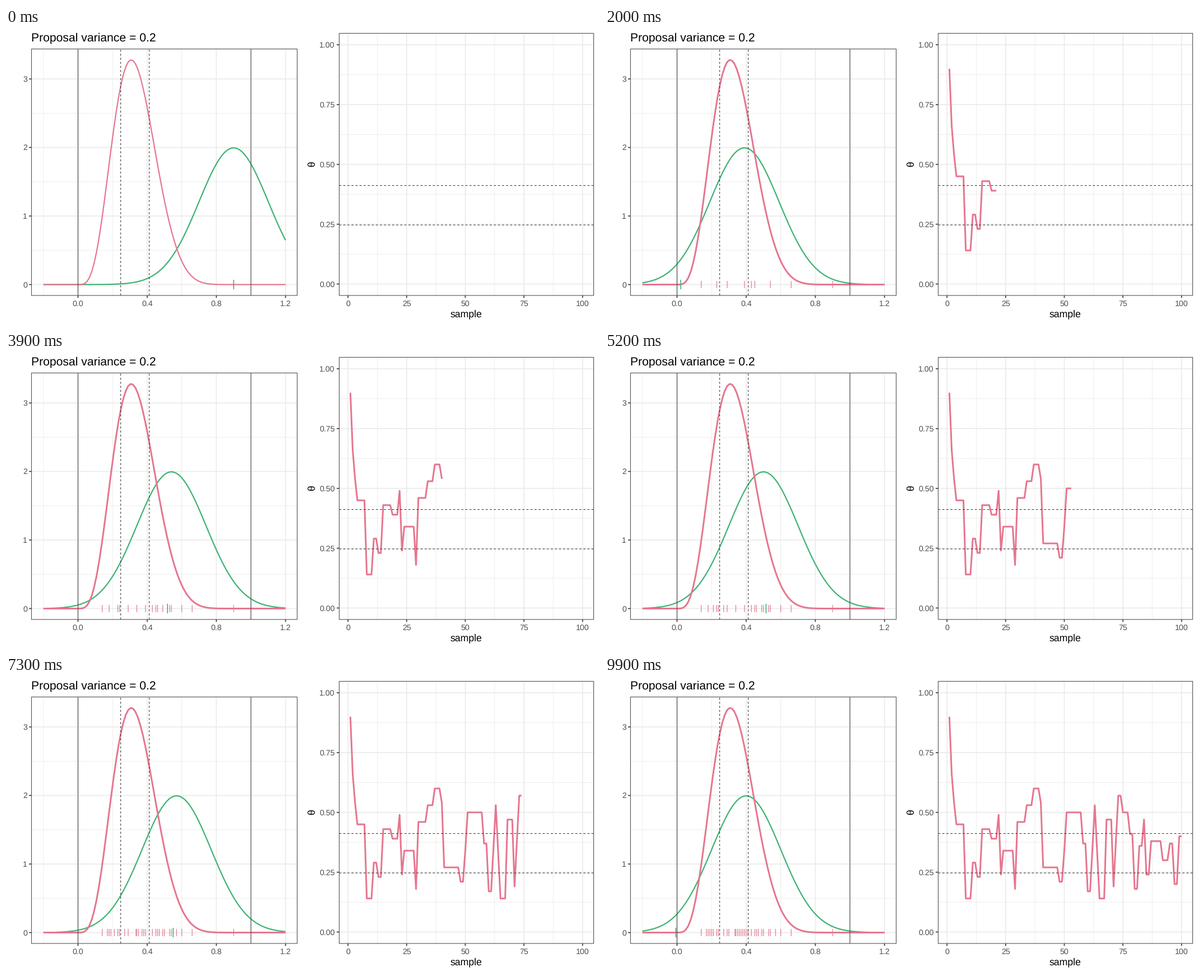
Recreate the animation shown at these times as a matplotlib script. Size 1058 px wide and 529 px high, loop 10000 ms.

```python
import numpy as np
import matplotlib.pyplot as plt
from matplotlib.animation import FuncAnimation
from matplotlib.collections import LineCollection

W, H, DPI = 1058, 529, 100
PT = 72 / DPI  # points per pixel
N, SD = 100, 0.2
PINK, GREEN = "#E6768F", "#3CB371"
GRID, DARK, RULE, LABEL = "#EBEBEB", "#333333", "#505050", "#4D4D4D"
QUARTILES = (0.2467, 0.4117)

plt.rcParams.update({"font.family": "Liberation Sans",
                     "text.hinting": "none",
                     "path.snap": False})

# Main moves of the chain: step -> level, kept until the next move
MOVES = {
    1: .90, 2: .66, 3: .54, 4: .45, 8: .14, 11: .29, 13: .23, 15: .43,
    19: .39, 22: .49, 23: .24, 24: .34, 29: .18, 30: .46, 34: .53, 37: .60,
    40: .54, 41: .27, 48: .21, 50: .34, 51: .50, 58: .37, 60: .17, 63: .53,
    65: .14, 68: .47, 71: .19, 73: .57, 75: .50, 78: .41, 80: .18, 82: .36,
    84: .47, 85: .24, 87: .38, 92: .30, 95: .37, 97: .20, 99: .40,
}


def build_chain(long_jump=0.35):
    """Hold each level; a long jump passes halfway one step early."""
    levels = np.empty(N)
    last = MOVES[1]
    for step, level in MOVES.items():
        levels[step - 1:] = level
        if abs(level - last) > long_jump:
            levels[step - 2] = (last + level) / 2
        last = level
    return levels


class Panel:
    """Maps data to stage pixels and draws a framed grid."""

    def __init__(self, box, origin, scale):
        self.box, self.origin, self.scale = box, origin, scale

    def x(self, v):
        return self.origin[0] + self.scale[0] * np.asarray(v)

    def y(self, v):
        return self.origin[1] - self.scale[1] * np.asarray(v)

    def vline(self, v, **kw):
        line([self.x(v)] * 2, [self.box[3], self.box[1]], **kw)

    def hline(self, v, **kw):
        line([self.box[0], self.box[2]], [self.y(v)] * 2, **kw)

    def draw(self, xs, ys, minor_x, minor_y, fmt_x, fmt_y):
        x0, y0, x1, y1 = self.box
        for v in minor_x:
            self.vline(v, color=GRID, width=0.9)
        for v in minor_y:
            self.hline(v, color=GRID, width=0.9)
        for v in xs:
            self.vline(v, color=GRID, width=1.7)
            line([self.x(v)] * 2, [y1, y1 + 4.4], color=DARK, width=1.6)
            text(self.x(v), 497, fmt_x.format(v), 14.1, LABEL, "center")
        for v in ys:
            self.hline(v, color=GRID, width=1.7)
            line([x0 - 4.4, x0], [self.y(v)] * 2, color=DARK, width=1.6)
            text(x0 - 7.6, self.y(v) + 5, fmt_y.format(v), 14.1, LABEL, "right")
        line([x0, x1, x1, x0, x0], [y0, y0, y1, y1, y0],
             color=RULE, width=1.1, z=9)


def line(xs, ys, color, width, z=1, **kw):
    kw.setdefault("solid_capstyle", "butt")
    return ax.plot(xs, ys, color=color, lw=width * PT, zorder=z, **kw)[0]


def text(x, y, s, size, color="black", ha="left", **kw):
    kw.setdefault("va", "baseline")
    ax.text(x, y, s, fontsize=size * PT, color=color, ha=ha, **kw)


def rug(values, half):
    base = density.y(0)
    return [[(x, base - half), (x, base + half)]
            for x in density.x(np.atleast_1d(values))]


def normal_curve(mean):
    z = (grid - mean) / SD
    return density.y(np.exp(-z * z / 2) / (SD * np.sqrt(2 * np.pi)))


fig = plt.figure(figsize=(W / DPI, H / DPI), dpi=DPI, facecolor="white")
ax = fig.add_axes([0, 0, 1, 1])
ax.set(xlim=(0, W), ylim=(H, 0))
ax.axis("off")

density = Panel((45.5, 37.5, 519.5, 478), (128.5, 458.5), (308.5, 122.5))
trace = Panel((594.5, 9.5, 1048.5, 478), (610.2, 457.5), (4.185, 427.5))

density.draw((0, .4, .8, 1.2), range(4), (-.2, .2, .6, 1),
             (.5, 1.5, 2.5), "{:.1f}", "{}")
trace.draw(range(0, 101, 25), np.arange(5) / 4, np.arange(12.5, 100, 25),
           np.arange(.125, 1, .25), "{}", "{:.2f}")
text(45, 24, "Proposal variance = 0.2", 21.2)
text(821, 516, "sample", 17.6, ha="center")
text(546, 243.5, "θ", 17.6, ha="center", va="center", rotation=90)

for v in (0, 1):
    density.vline(v, color=RULE, width=1.2, z=6)
dash = dict(color="#3A3A3A", width=1.1, z=6, ls=(0, (3.4, 3.2)))
for q in QUARTILES:
    density.vline(q, **dash)
    trace.hline(q, **dash)

grid = np.linspace(-0.2, 1.2, 101)
inside = np.clip(grid, 0, 1)
beta = 10010 * inside**4 * (1 - inside)**9  # Beta(5, 10)

chain = build_chain()
rng = np.random.default_rng(7)
proposal = np.clip(rng.normal(chain, SD), -0.2, 1.2)

marks = LineCollection([], colors=PINK, linewidths=1.2 * PT, zorder=5)
tick = LineCollection([], colors=GREEN, linewidths=1.6 * PT, zorder=7)
for c in (marks, tick):
    ax.add_collection(c, autolim=False)
kernel = line(density.x(grid), normal_curve(chain[0]), GREEN, 2.2, 3)
target = line(density.x(grid), density.y(beta), PINK, 2.2, 4)
path = line([], [], PINK, 3, 4, solid_joinstyle="round")


def update(i):
    seen = chain[:i + 1]
    kernel.set_ydata(normal_curve(chain[i]))
    # Earlier copies stay underneath, so the pink strokes grow firmer
    fresh = np.exp(-i / 4)
    target.set_linewidth((3 - 0.8 * fresh) * PT)
    marks.set_alpha(1 - 0.35 * fresh)
    marks.set_segments(rug(np.unique(seen), 6.5))
    tick.set_segments(rug(proposal[i], 8.5))
    path.set_data(trace.x(np.arange(1, i + 2)), trace.y(seen))
    return kernel, target, path, marks, tick


anim = FuncAnimation(fig, update, frames=N, interval=100, repeat=True,
                     repeat_delay=0, blit=False)
plt.show()
```
